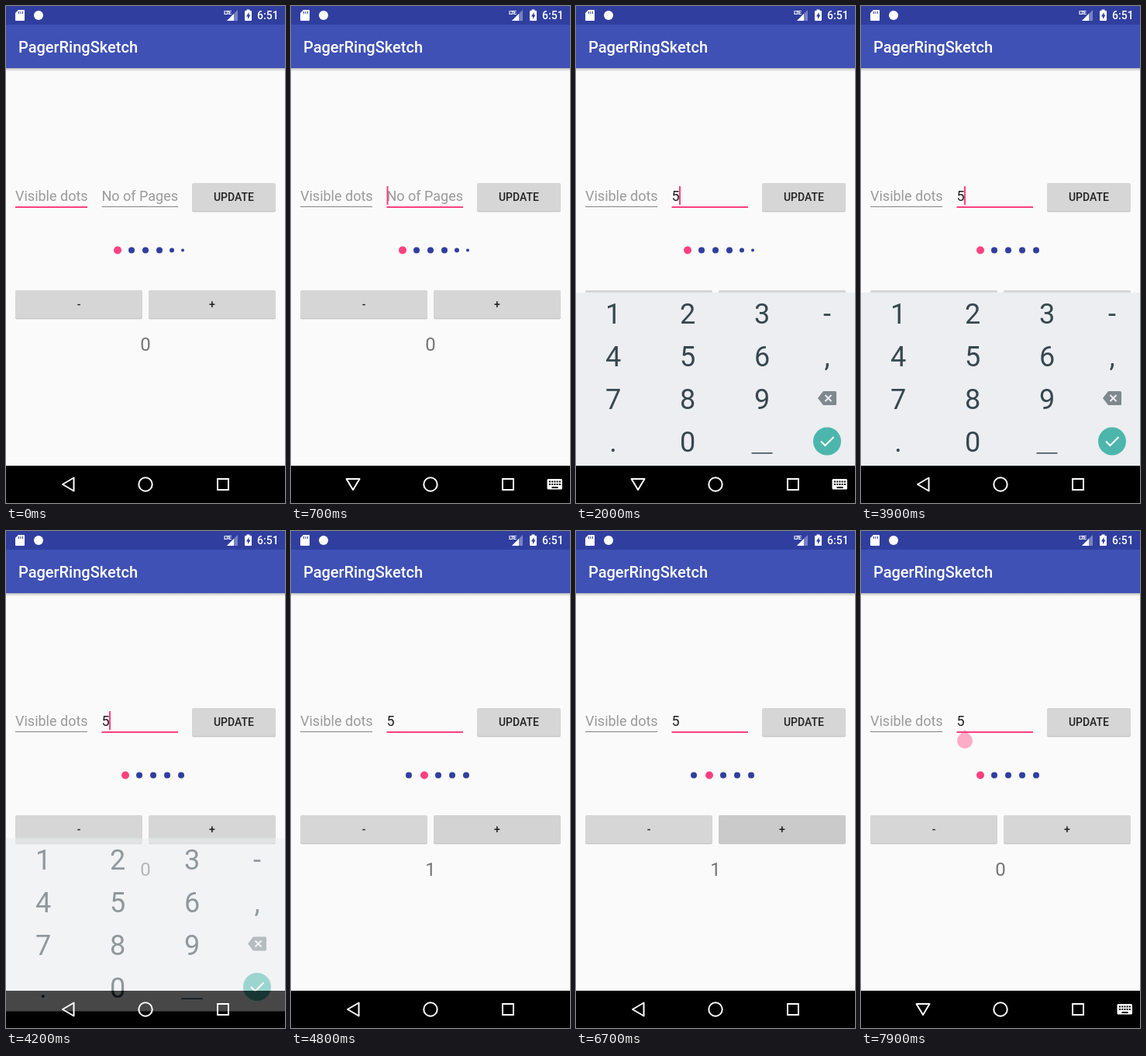
These frames come from a looping animation (360 by 640 pixels, 8000 ms). An HTML page:

```html
<!DOCTYPE html>
<html lang="en">
<head>
<meta charset="utf-8">
<title>Page dots demo</title>
<style>
  html, body { margin: 0; width: 100%; height: 100%; overflow: hidden; background: #fafafa; }
  svg { display: block; width: 100%; height: 100%; font-family: Roboto, sans-serif; }
  .mid { text-anchor: middle; }
  .bold { font-weight: 500; }
</style>
</head>
<body>
<svg viewBox="0 0 360 640">
  <defs>
    <linearGradient id="shade" x2="0" y2="1">
      <stop stop-color="#000" stop-opacity=".25"/>
      <stop offset="1" stop-color="#000" stop-opacity="0"/>
    </linearGradient>
  </defs>
  <rect width="360" height="640" fill="#fafafa"/>

  <!-- app bar and status bar -->
  <rect y="80" width="360" height="4" fill="url(#shade)"/>
  <rect width="360" height="80" fill="#3f51b5"/>
  <rect width="360" height="24" fill="#303f9f"/>
  <text x="16" y="59.5" font-size="20" fill="#fff" class="bold">PagerRingSketch</text>
  <g fill="#fff">
    <path d="M16 5h7q1 0 1 1v12q0 1-1 1h-10q-1 0-1-1v-9z"/>
    <path d="M16.5 7v3M19 7v3M21.5 7v3" stroke="#303f9f"/>
    <circle cx="42" cy="12" r="6"/>
    <text x="281" y="11" font-size="8" font-weight="700" textLength="10">LTE</text>
    <path d="M299 5v14h-14l6-6v-1h1z" opacity=".35"/>
    <path d="M294 10v9h-9z"/>
    <path d="M310.500 6v-1.500h4v1.500h1.500q1 0 1 1v11q0 1-1 1h-7q-1 0-1-1v-11q0-1 1-1z"/>
    <path d="M313.500 8l-3.500 5.500h2v3.500l3.500-5.500h-2z" fill="#303f9f"/>
    <text x="324" y="17" font-size="14" class="bold">6:51</text>
  </g>

  <!-- form -->
  <g font-size="18" fill="#9a9a9a">
    <text x="12" y="251">Visible dots</text>
    <text id="pages" x="123.500" y="251"></text>
  </g>
  <rect id="line1" x="12" width="93"/>
  <rect id="line2" x="123.500" width="98.500"/>
  <rect id="cursor" y="232" width="2" height="24" fill="#ff4081"/>
  <path id="handle" d="M134 256l7 7a10 10 0 1 1-14 0z" fill="#ff4081" opacity=".42"/>
  <g id="buttons"></g>
  <g id="dots"></g>
  <text id="count" x="180" y="443.500" font-size="24" fill="#757575" class="mid"></text>

  <!-- keyboard and navigation -->
  <rect y="592" width="360" height="48"/>
  <g id="keyboard">
    <rect y="369" width="360" height="223" fill="#eceef1"/>
    <g id="keys" font-size="36" fill="#37474f" class="mid"></g>
    <rect x="226.500" y="575" width="27" height="1.500" fill="#37474f"/>
    <path d="M319 496h15.500q1.500 0 1.500 1.500v15q0 1.500-1.500 1.500h-15.500l-7-9z" fill="#7f888d"/>
    <path d="M321.500 501l8 8m0-8l-8 8" stroke="#eceef1" stroke-width="2"/>
    <circle cx="324" cy="560.500" r="18" fill="#4db6ac"/>
    <path d="M316 560.500l5.500 5.500 11-11" fill="none" stroke="#fff" stroke-width="2"/>
  </g>
  <rect y="592" width="360" height="48" opacity=".45"/>
  <g fill="none" stroke="#fff" stroke-width="2">
    <path id="back" stroke-linejoin="round"/>
    <circle cx="180" cy="616" r="8.700"/>
    <rect x="273" y="609" width="14" height="14"/>
  </g>
  <g id="switcher">
    <rect x="330.500" y="609" width="19.500" height="13.500" rx="1.500" fill="#fff"/>
    <path d="M333 612.500h15M333 616h15" stroke="#000" stroke-width="2" stroke-dasharray="2 1.200"/>
    <path d="M336.500 620h8" stroke="#000" stroke-width="2"/>
  </g>
</svg>
<script>
const LOOP = 8000;
const PINK = '#ff4081', BLUE = '#303f9f';
const $ = id => document.getElementById(id);
const set = (node, attrs) => {
  for (const name in attrs) node.setAttribute(name, attrs[name]);
  return node;
};
const add = (parent, tag, attrs, text = '') => {
  const node = document.createElementNS('http://www.w3.org/2000/svg', tag);
  node.textContent = text;
  return parent.appendChild(set(node, attrs));
};
const show = (id, visible) => set($(id), { visibility: visible ? 'visible' : 'hidden' });
const clamp = v => Math.max(0, Math.min(1, v));
const ramp = (t, from, to) => clamp((t - from) / (to - from));
const passed = (times, t) => times.filter(time => t >= time).length;

function makeButton(x, y, width, label) {
  const box = { x, width, height: 36, rx: 2 };
  const group = $('buttons');
  add(group, 'rect', { ...box, y: y + 1.5, fill: '#000', opacity: .13 });
  add(group, 'rect', { ...box, y: y + .8, fill: '#000', opacity: .12 });
  const face = add(group, 'rect', { ...box, y });
  add(group, 'text', { x: x + width / 2, y: y + 23, 'font-size': 14, fill: '#212121', class: 'mid bold' }, label);
  return face;
}
const update = makeButton(240, 228, 108, 'UPDATE');
const minus = makeButton(12, 366, 164, '-');
const plus = makeButton(184, 366, 164, '+');
const tint = (button, amount) => {
  const v = Math.round(214 - 12 * amount);
  set(button, { fill: `rgb(${v},${v},${v})` });
};
tint(minus, 0);

['123-', '456,', '789', '.0'].forEach((row, r) => [...row].forEach((key, c) =>
  add($('keys'), 'text', { x: [48, 144, 240, 324][c], y: 409 + 55 * r }, key)));

const dots = Array.from({ length: 6 }, () => add($('dots'), 'circle', { cy: 314.5 }));
function drawDots(total, selected) {
  const left = total === 6 ? 142 : 152;
  dots.forEach((dot, i) => {
    const shrink = Math.max(0, i - 3) * (total === 6);
    const x = left + 18 * i + (i >= selected ? 2 : 0) - [0, 2, 6][shrink];
    const r = i >= total ? 0 : i === selected ? 5 : 4 - shrink;
    set(dot, { cx: x, r, fill: i === selected ? PINK : BLUE });
  });
}

const underline = (id, focused) => set($(id), focused
  ? { y: 258, height: 2, fill: PINK }
  : { y: 258, height: 1, fill: '#858585' });

const BLINKS = [150, 600, 600, 1100, 1600, 2450, 2950, 3450, 3850, 4550, 5000, 5450, 5950, 6500, 7050, 7450];
const PLUS_TAPS = [4650, 4850, 5050, 5250];
const MINUS_TAPS = [5950, 6250, 6550, 6850];

function render(t) {
  const second = t >= 600, typed = t >= 1950;
  underline('line1', !second);
  underline('line2', second);
  $('pages').textContent = typed ? '5' : 'No of Pages';
  set($('pages'), { fill: typed ? '#212121' : '#9a9a9a' });
  set($('cursor'), { x: typed ? 133 : second ? 123.5 : 12 });
  show('cursor', passed(BLINKS, t) % 2);
  show('handle', t >= 7850);

  const page = passed(PLUS_TAPS, t) - passed(MINUS_TAPS, t);
  drawDots(t < 2650 ? 6 : 5, page);
  $('count').textContent = page;
  tint(update, ramp(t, 2250, 2500) - ramp(t, 2650, 3000));
  tint(plus, ramp(t, 4600, 5400) - ramp(t, 7200, 7850));

  // keyboard slides and fades in, later out
  const enter = 1 - (1 - ramp(t, 830, 990)) ** 2;
  const leave = ramp(t, 4080, 4259) ** 2;
  const drop = 75 * (1 - enter) + 58 * leave;
  set($('keyboard'), { opacity: enter - leave, transform: `translate(0 ${drop})` });

  const open = t >= 650 && t < 3850 || t >= 7850;
  set($('back'), { d: open ? 'M71.500 609h17l-8.500 14z' : 'M73 616l14.500-8.500v17z' });
  show('switcher', open);
}

const start = performance.now();
function tick() {
  render((performance.now() - start) % LOOP);
  requestAnimationFrame(tick);
}
tick();
</script>
</body>
</html>
```
